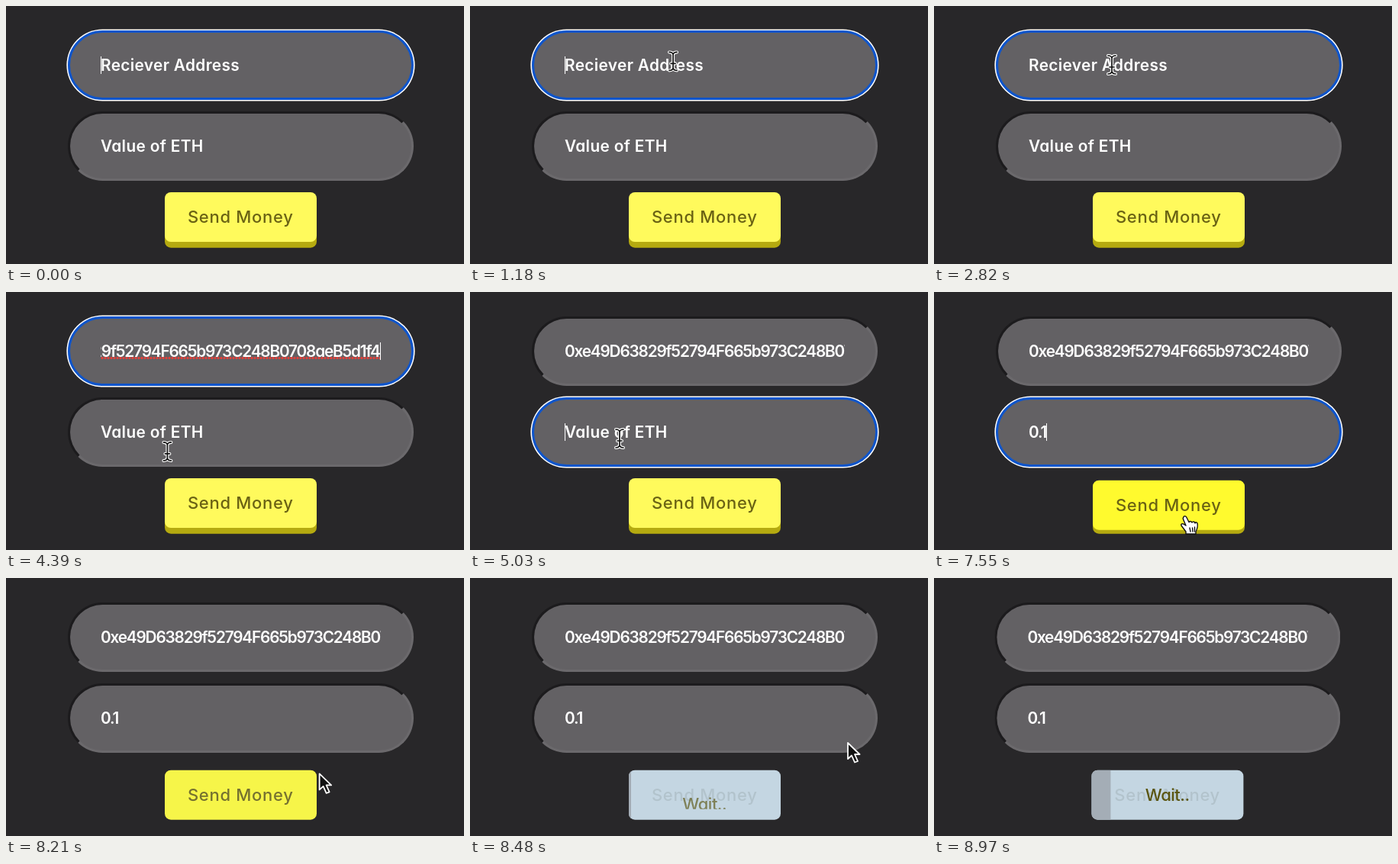
Recreate the animation shown at these times as an HTML page. Size 600x338 px, loop 9000 ms.

```html
<!DOCTYPE html>
<html lang="en">
<head>
<meta charset="utf-8">
<title>Send money form</title>
<style>
  html, body { margin: 0; width: 100%; height: 100%; overflow: hidden; background: #282729; }
  #stage { position: absolute; width: 600px; height: 338px; font-family: Inter, sans-serif; font-feature-settings: "cv11"; }
  .field {
    position: absolute; left: 81px; width: 453px; height: 91px; box-sizing: border-box;
    border: 3px solid; border-color: #1c1b1d #6b696c #6b696c #1c1b1d;
    border-radius: 46px; background: #636164;
  }
  .field.focus { border-color: #0f55cb; box-shadow: 0 0 0 1.6px #fff; }
  .line {
    position: absolute; left: 40px; top: 24px; width: 367px; height: 36px;
    display: flex; align-items: center; overflow: hidden;
    color: #fff; font-size: 20.8px; font-weight: 600; letter-spacing: .35px; white-space: pre;
  }
  .typed { letter-spacing: -1.2px; }
  .caret { flex: none; width: 1.3px; height: 23px; background: #fff; }
  .spell {
    position: absolute; left: 40px; top: 50px; width: 366px; height: 3px;
    background: radial-gradient(circle, #e0403a 1.3px, #e0403a00 1.9px) 0 0 / 4px 3px;
  }
  #button {
    position: absolute; left: 208px; top: 243.5px; width: 198.5px; height: 65.5px;
    border-radius: 8px; overflow: hidden; text-align: center; font-size: 22px; font-weight: 500;
  }
  #label { position: absolute; inset: 0; line-height: 65.5px; letter-spacing: .7px; }
  #bar { position: absolute; left: 0; top: 0; height: 100%; background: #a4adb6; }
  #slot { position: absolute; left: 0; right: 0; top: 14px; height: 37px; line-height: 37px; overflow: hidden; }
  #wait { color: #5a5510; letter-spacing: -.5px; }
  #mouse { position: absolute; left: 0; top: 0; overflow: visible; }
</style>
</head>
<body>
<div id="stage">
  <div class="field" style="top:32px"><div class="line"><span></span><i class="caret"></i></div><div class="spell"></div></div>
  <div class="field" style="top:138px"><div class="line"><span></span><i class="caret"></i></div></div>
  <div id="button">
    <div id="bar"></div>
    <div id="label">Send Money</div>
    <div id="slot"><div id="wait">Wait..</div></div>
  </div>
  <svg id="mouse" width="1" height="1" stroke-linejoin="round" stroke-linecap="round">
    <defs><path id="beamPath" d="M-5-12q4 0 5 3q1-3 5-3M0-9V9M-5 12q4 0 5-3q1 3 5 3M-3 3H3"/></defs>
    <g id="beam" fill="none">
      <use href="#beamPath" stroke="#fff" stroke-width="4"/>
      <use href="#beamPath" stroke="#111" stroke-width="1.7"/>
    </g>
    <path id="arrow" fill="#111" stroke="#fff" stroke-width="1.8" d="M1 1V22L6 17.5L10 26.5L14 25L10 16H16.5Z"/>
    <g id="hand" fill="#fff" stroke="#111" stroke-width="1.4">
      <path d="M-2 1c-1.5 1-.5 3 0 4l3 7l-3-2c-2-1-4 0-3 2l6 8v3h13v-3c2-4 3-7 2-11c-1-2-3-1.5-3 0c0-2-3-3-4-1c-1-2-3-2-4-.5l-3-6c-1-2-3-2.5-4-1z"/>
      <path fill="none" d="M6 15l1 5M9.5 15l.5 5M12.5 14v6"/>
    </g>
  </svg>
</div>
<script>
const LOOP = 9000, ADDRESS = "0xe49D63829f52794F665b973C248B0708aeB5d1f4";
const PASTE = 3400, FOCUS_VALUE = 4700, TYPE = [5420, 5800, 6100], PRESS = 7700, LOADING = 8150, CUT = 8800;
const MOVE_AGAIN = 6500;
// Pointer hot spot: time, x, y
const PATH = [
  [480, 300, -24], [1360, 262, 84], [1480, 262, 84], [2300, 222, 72], [2480, 222, 72], [2820, 233, 77],
  [3030, 235, 78], [3390, 235, 78], [4240, 211.5, 209], [4360, 211.5, 209], [5030, 196, 192],
  [MOVE_AGAIN, 196, 192], [7360, 329, 294], [7950, 329, 294], [8480, 494, 215], [CUT, 566, 232]
];
const $ = id => document.getElementById(id);
const fields = [...document.querySelectorAll(".field")];
const clamp = v => Math.max(0, Math.min(1, v));
const ramp = (t, from, to) => { const k = clamp((t - from) / (to - from)); return k * k * (3 - 2 * k); };
const mix = (a, b, k) => a.map((v, i) => v + (b[i] - v) * k);
const rgb = c => `rgb(${c})`;
const show = (el, on) => el.style.display = on ? "" : "none";

function drawField(el, text, typed, focused, blink, scrolled) {
  const line = el.firstElementChild, [span, caret] = line.children;
  el.classList.toggle("focus", focused);
  line.classList.toggle("typed", typed);
  line.style.justifyContent = scrolled ? "flex-end" : "flex-start";
  span.textContent = text;
  // The caret stands before a placeholder and after typed text
  caret.style.order = typed ? 0 : -1;
  caret.style.marginRight = typed ? "0" : "-1.3px";
  show(caret, focused && blink);
}

function drawPointer(t) {
  const i = Math.max(1, PATH.findIndex(p => p[0] >= t)), a = PATH[i - 1], b = PATH[i];
  const [, x, y] = mix(a, b, ramp(t, a[0], b[0]));
  const typing = t >= TYPE[0] && t < MOVE_AGAIN;
  show($("mouse"), t >= PATH[0][0] && t < CUT && !typing);
  $("mouse").style.transform = `translate(${x}px, ${y}px)`;
  const ready = t < LOADING;
  const beam = ready && x > 83 && x < 534 && (y > 34 && y < 123 || y > 140 && y < 229);
  const hand = ready && x > 208 && x < 407 && y > 244 && y < 317;
  show($("beam"), beam);
  show($("hand"), hand);
  show($("arrow"), !beam && !hand);
}

function drawButton(t) {
  const hover = ramp(t, 7180, 7330), press = ramp(t, PRESS, PRESS + 100);
  const loading = ramp(t, LOADING, 8400), wait = ramp(t, 8360, 8560);
  const drop = 2.7 * hover + 5 * press, s = $("button").style;
  s.transform = `translateY(${drop}px)`;
  s.boxShadow = `0 ${7.7 - drop}px 0 #b5aa10`;
  s.backgroundColor = rgb(mix(mix([255, 250, 92], [255, 250, 46], hover), [196, 214, 226], loading));
  $("label").style.color = rgb(mix([106, 98, 20], [178, 195, 204], loading));
  $("bar").style.width = Math.max(0, (t - 8413) * .0449) + "px";
  $("wait").style.transform = `translateY(${37 * (1 - wait)}px)`;
  $("wait").style.opacity = wait;
}

function frame() {
  const t = performance.now() % LOOP;
  const pasted = t >= PASTE, first = t < FOCUS_VALUE;
  const count = TYPE.filter(k => t >= k).length;
  const blinkSince = start => (t - start) % 1000 < 500;
  drawField(fields[0], pasted ? ADDRESS : "Reciever Address", pasted, first, blinkSince(0), pasted && first);
  drawField(fields[1], count ? "0.1".slice(0, count) : "Value of ETH", count > 0, !first && t < PRESS,
    blinkSince(TYPE[count - 1] || FOCUS_VALUE), false);
  show(fields[0].lastElementChild, pasted && first);
  drawPointer(t);
  drawButton(t);
  $("stage").style.transform = t >= CUT ? "translateX(-1.6px)" : "";
  requestAnimationFrame(frame);
}
frame();
</script>
</body>
</html>
```
